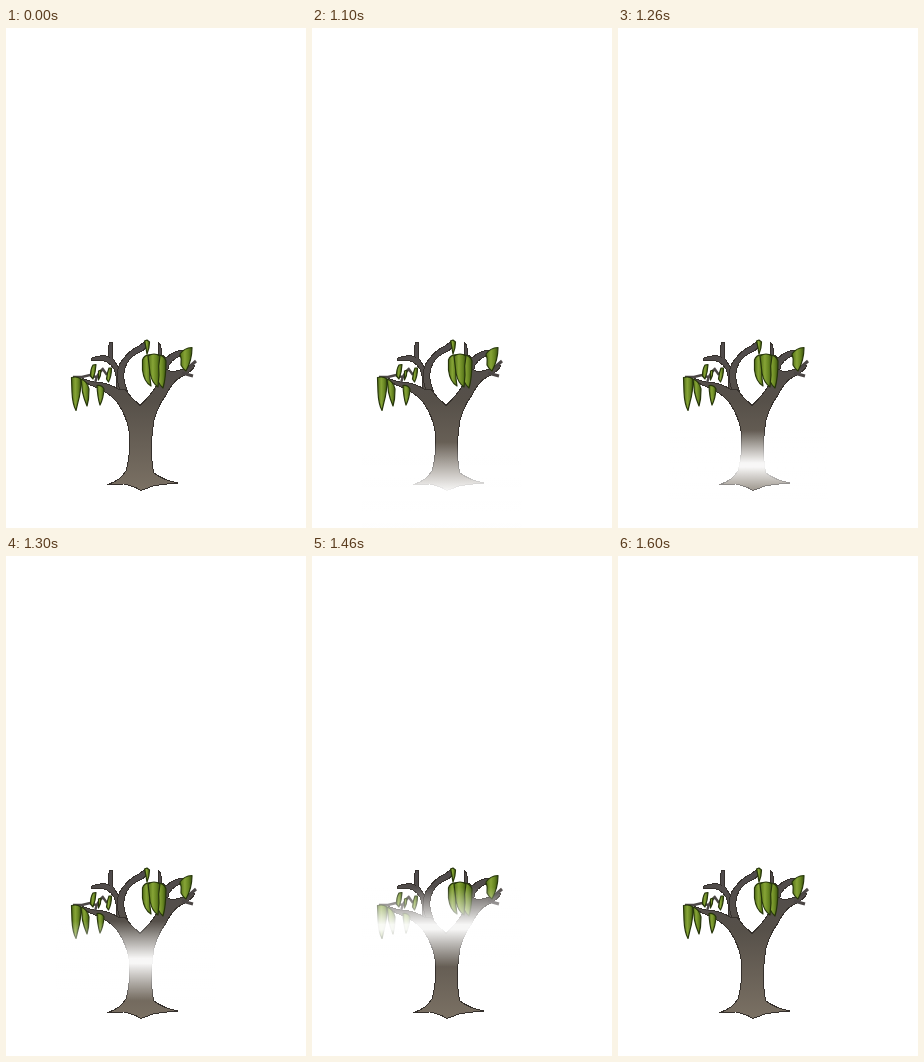
An HTML page that plays this animation: 300x500 px, repeating every 1700 ms.

```html
<!DOCTYPE html>
<html lang="en">
<head>
<meta charset="utf-8">
<title>Tree with a passing shine</title>
<style>
  html, body { margin: 0; width: 100%; height: 100%; overflow: hidden; background: #fff; }
  svg { display: block; width: 100%; height: 100%; }
  .bark { fill: url(#bark); stroke: #35302c; stroke-width: 1; shape-rendering: crispEdges; }
  .twig { fill: none; stroke: #4b4645; }
  .pod { fill: url(#leaf); stroke: #26350a; stroke-width: 1.2; stroke-linejoin: round; }
  .shine { animation: sweep 1.7s step-end infinite; }
  /* rest 1100 ms, then one step up every 100 ms */
  @keyframes sweep {
    0% { transform: translateY(600px); }
    64.706% { transform: translateY(466px) scaleY(1.3); }
    70.588% { transform: translateY(437px) scaleY(.87); }
    76.471% { transform: translateY(405px); }
    82.353% { transform: translateY(371px); }
    88.235% { transform: translateY(315px); }
    94.118%, 100% { transform: translateY(600px); }
  }
</style>
</head>
<body>
<svg viewBox="0 0 300 500">
  <defs>
    <linearGradient id="bark" gradientUnits="userSpaceOnUse" x1="0" y1="312" x2="0" y2="463">
      <stop offset="0" stop-color="#4f4b4c"/>
      <stop offset=".4" stop-color="#565049"/>
      <stop offset="1" stop-color="#7b7164"/>
    </linearGradient>
    <linearGradient id="leaf">
      <stop offset="0" stop-color="#536f17"/>
      <stop offset=".4" stop-color="#86a436"/>
      <stop offset=".7" stop-color="#688622"/>
      <stop offset="1" stop-color="#3a520e"/>
    </linearGradient>
    <linearGradient id="glow" x2="0" y2="1">
      <stop offset="0" stop-color="#fff" stop-opacity="0"/>
      <stop offset=".47" stop-color="#fff" stop-opacity=".95"/>
      <stop offset=".53" stop-color="#fff" stop-opacity=".95"/>
      <stop offset="1" stop-color="#fff" stop-opacity="0"/>
    </linearGradient>
  </defs>

  <g class="bark">
    <!-- thin branches -->
    <path d="M110 363Q112 349 108 341Q102 332 93 332L85 332.500V330.500Q92 327 100 328
      L103 329L102.500 319L104 314H106L106.500 330Q112 337 115 346L119 364Z"/>
    <path d="M114 362Q107 343 117 331Q125 321 133 318Q138 314 141 312.500L143 315
      Q139 323 132 325Q122 330 119 340Q116 350 121 362Z"/>
    <path d="M153 344L155 334L152.500 326V315L154.500 317L156 327L160 330
      Q166 324 176 322L181 325Q168 329 163 337L160 348Z"/>

    <!-- trunk and main fork -->
    <path d="M101.500 456.500Q114 453 120 443Q125 425 123.500 405Q121 388 111 374
      Q103 365 93 360.500Q85 358 76 352.500L77 350.500Q88 355 97 355Q106 357 112 361H119
      Q125 370 134 377.500Q145 367 151 357Q156 348 158 340L166 344L174 342Q180 341 185 337L189 338
      Q184 345 175 349Q167 353 160 367Q148 383 146.500 402Q144 430 148 445Q157 452 172 455
      Q157 456 147 458L135 462.500Q128 458 118 456Z"/>
  </g>
  <path class="twig" stroke-width="3" d="M176 345L187 348M182 340L190 333"/>
  <path class="twig" stroke-width="2.400" d="M67 349H76L84 347L90 349M89 355Q91 346 96 342M96 340L101 347"/>

  <!-- hanging leaves -->
  <g class="pod">
    <path d="M65.500 349.500Q71 348 75 351Q75 364 72 374L70 382.500Q66.500 376 66 364Z"/>
    <path d="M75 351Q81 353 83 361L82.500 371L81 378Q78 371 76.500 364Z"/>
    <path d="M91 357.500Q96 357 98 361Q97.500 370 94 377Q91.500 369 91 357.500Z"/>
    <path d="M87 337L90 336.500Q89.500 345 87 351L84.500 348Q84.500 341 87 337Z"/>
    <path d="M103 340H105.500Q105.500 348 102.500 354L100.500 351Q101 345 103 340Z"/>
    <path d="M92.500 343L95 342Q95 348 92.500 352Z"/>
    <path d="M138.500 313L141 312L143.500 314Q143.500 320 141 326Q140 319 138.500 313Z"/>
    <path d="M136.500 332Q138 326 146 327Q142 341 145 358Q138 354 136.500 342Z"/>
    <path d="M149 327Q158 326 160 333Q160 350 157 360Q151 355 149 343Z"/>
    <path d="M142 328Q148 324 154 328Q152 338 153 347L152 359Q146 355 144 345Z"/>
    <path d="M174 326Q178 320 186 319.500Q186 332 180 343Q177 341 175 337Q176 331 174 326Z"/>
  </g>

  <rect class="shine" x="50" y="-40" width="160" height="80" fill="url(#glow)"/>
</svg>
</body>
</html>
```
